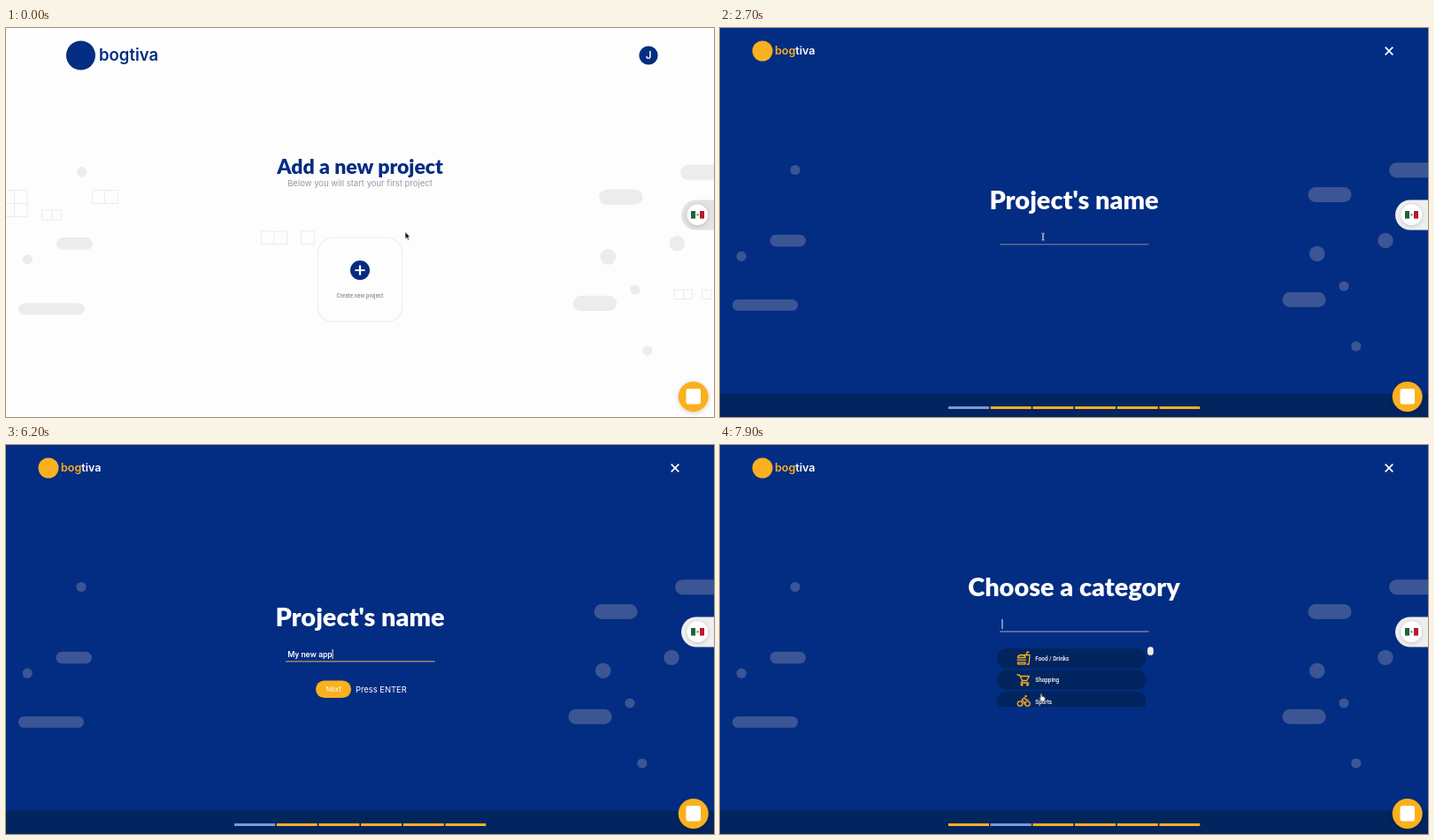
An HTML page that plays this animation: 800x440 px, repeating every 8000 ms.

```html
<!DOCTYPE html>
<html lang="en">
<head>
<meta charset="utf-8">
<title>New project</title>
<style>
  html, body { margin: 0; width: 100%; height: 100%; overflow: hidden; background: #fdfdfe; }
  svg { display: block; width: 100vw; height: 100vh; font-family: Inter, sans-serif; }
  .title { font: 900 28.9px Lato, sans-serif; text-anchor: middle; fill: #fff; }
  .small { font-family: Roboto, sans-serif; }
  .mid { text-anchor: middle; }
  .line { fill: none; stroke-linecap: round; stroke-linejoin: round; }

  #light, #dark, #question, #category, #active, #tab, #status, #focus, #next,
  #mouse, #halo, #arrow, #beam, #hand { animation: 8s linear infinite; }
  #light, #dark, #active, #tab, #arrow, #beam, #hand { animation-timing-function: step-end; }

  #light { animation-name: light; }
  @keyframes light { 0% { visibility: visible } 18.6%, 100% { visibility: hidden } }
  #dark { animation-name: dark; }
  @keyframes dark { 0% { visibility: hidden } 18.6%, 100% { visibility: visible } }
  #tab { animation-name: tab; }
  @keyframes tab { 0% { fill: #e3e3e6 } 18.6%, 100% { fill: #efeff0 } }

  #status { animation-name: status; }
  @keyframes status {
    0%, 16.1% { opacity: 0 } 16.2%, 18% { opacity: 1 } 20%, 100% { opacity: 0 }
  }

  #question { animation-name: question; }
  @keyframes question {
    0%, 91.3% { transform: none; opacity: 1; animation-timing-function: ease-out }
    93.7%, 94.8% { transform: translateY(-18px); opacity: 1 }
    95%, 100% { transform: translateY(-18px); opacity: 0 }
  }
  #category { animation-name: category; }
  @keyframes category { 0%, 94.8% { opacity: 0 } 97%, 100% { opacity: 1 } }
  #active { animation-name: active; }
  @keyframes active { 0% { transform: none } 95%, 100% { transform: translateX(47.7px) } }

  #focus { animation-name: focus; transform-origin: 400px 245px; }
  @keyframes focus {
    0%, 36.2% { transform: scaleX(0); animation-timing-function: ease-out }
    40%, 100% { transform: none }
  }
  #next { animation-name: next; }
  @keyframes next {
    0%, 49.5% { opacity: 0; transform: translateY(-4px) }
    52.5%, 100% { opacity: 1; transform: none }
  }

  #mouse { animation-name: mouse; }
  @keyframes mouse {
    0%, 12.3% { transform: translate(451px, 230.5px); animation-timing-function: ease-in-out }
    16.8%, 24.8% { transform: translate(400px, 273px); animation-timing-function: ease-in-out }
    35%, 43.5% { transform: translate(364px, 235px); animation-timing-function: ease-in-out }
    46.3%, 78% { transform: translate(352px, 288px); animation-timing-function: ease-in-out }
    85%, 100% { transform: translate(362.5px, 281.5px) }
  }
  #halo { animation-name: halo; }
  @keyframes halo {
    0%, 15.9% { opacity: 0 } 17%, 17.6% { opacity: 1 } 18.5%, 36% { opacity: 0 }
    37.3%, 38% { opacity: 1 } 40%, 88.5% { opacity: 0 }
    90%, 92.5% { opacity: 1 } 95%, 100% { opacity: 0 }
  }
  #arrow { animation-name: arrow; }
  @keyframes arrow {
    0% { opacity: 1 } 33.7% { opacity: 0 } 44.5% { opacity: 1 }
    48.7% { opacity: 0 } 78.5% { opacity: 1 } 83.7%, 100% { opacity: 0 }
  }
  #beam { animation-name: beam; }
  @keyframes beam { 0% { opacity: 0 } 33.7% { opacity: 1 } 44.5%, 100% { opacity: 0 } }
  #hand { animation-name: hand; }
  @keyframes hand { 0% { opacity: 0 } 83.7%, 100% { opacity: 1 } }
</style>
</head>
<body>
<svg viewBox="0 0 800 440">
  <defs>
    <g id="shapes">
      <rect x="56.5" y="233.7" width="40.5" height="13.5" rx="6.7"/>
      <rect x="14" y="307" width="74" height="12.8" rx="6.4"/>
      <rect x="664.5" y="180" width="49" height="17" rx="8.5"/>
      <rect x="756" y="152.3" width="60" height="17" rx="8.5"/>
      <rect x="635.5" y="298.7" width="49" height="17" rx="8.5"/>
      <circle cx="85" cy="160.5" r="5.6"/>
      <circle cx="24.2" cy="258.2" r="5.6"/>
      <circle cx="674.7" cy="255.3" r="8.8"/>
      <circle cx="752" cy="240.4" r="8.7"/>
      <circle cx="705" cy="292" r="5.6"/>
      <circle cx="718.8" cy="360" r="5.6"/>
    </g>
    <filter id="shadow" x="-40%" y="-40%" width="180%" height="180%">
      <feDropShadow dx="0" dy="1" stdDeviation="2.6" flood-opacity=".2"/>
    </filter>
    <clipPath id="listClip"><rect x="310" y="225" width="182" height="71"/></clipPath>
  </defs>

  <g id="light">
    <rect width="800" height="440" fill="#fdfdfe"/>
    <rect width="800" height="52" fill="#fefefe"/>
    <use href="#shapes" fill="#ececed" transform="scale(1.0083 1.0139)"/>
    <path fill="none" stroke="#ebece9" d="M-5 183.5h29v30h-29zM9.5 183.5v30M-5 198.5h29M97.5 183.5h29v15h-29zM111.5 183.5v15
      M40.500 206h22v11h-22zM51.500 206v11M288.500 230h29v14.500h-29zM303 230v14.500M333.500 230h15v14.500h-15z
      M755 296h20.500v10.500h-20.500zM765.500 296v10.500M786.500 296h10.500v10.500h-10.500z"/>
    <circle cx="84.5" cy="31" r="16.5" fill="#032d82"/>
    <text x="105" y="37" font-size="18.5" font-weight="600" fill="#032d82">bogtiva</text>
    <circle cx="726" cy="31" r="10.6" fill="#032d82"/>
    <text class="mid" x="726" y="35" font-size="11.5" font-weight="600" fill="#fff">J</text>
    <text class="title" x="400" y="165" style="font-size:23px;fill:#032d82">Add a new project</text>
    <text class="mid" x="400" y="178.5" font-size="9.5" fill="#9a9a9e">Below you will start your first project</text>
    <rect x="352.5" y="237.2" width="95" height="95" rx="17" fill="#fdfdfe" stroke="#efeff0" stroke-width="1.2"/>
    <circle cx="400" cy="274" r="11" fill="#032d82"/>
    <path d="M394.5 274h11M400 268.5v11" stroke="#fff" stroke-width="2.2"/>
    <text class="mid small" x="400" y="305.3" font-size="6.35" fill="#77777b">Create new project</text>
  </g>

  <g id="dark">
    <rect width="800" height="440" fill="#032d82"/>
    <rect y="413.5" width="800" height="27" fill="#02245f"/>
    <use href="#shapes" fill="#3b5595"/>
    <circle cx="48" cy="26" r="11.5" fill="#fbb01f"/>
    <text x="62" y="29.8" font-size="12.5" font-weight="600" fill="#fff"><tspan fill="#fbb01f">bog</tspan>tiva</text>
    <path d="M751.7 21.7l8.6 8.6m0-8.6l-8.6 8.6" stroke="#fff" stroke-width="1.7"/>
    <path d="M258 429.5H542.3" stroke="#fbb01f" stroke-width="2.8" stroke-dasharray="46 1.7"/>
    <path id="active" d="M258 429.5h46" stroke="#7b9ad8" stroke-width="2.8"/>

    <g id="question">
      <text class="title" x="400" y="205.3">Project's name</text>
      <path d="M316 244.8h168.5" stroke="#86888d"/>
      <path id="focus" d="M316 244.8h168.5" stroke="#b3924f"/>
      <text id="typed" class="small" xml:space="preserve" x="318.3" y="240.3" font-size="9.4" font-weight="500" fill="#fff"></text>
      <rect id="caret" y="231" width=".9" height="11" fill="#fff"/>
      <g id="next">
        <rect x="350" y="266.5" width="40" height="19.5" rx="9.7" fill="#fbb01f"/>
        <text class="mid" x="370" y="279.3" font-size="8" fill="#fff">Next</text>
        <text x="395" y="279.8" font-size="9.4" fill="#fff">Press ENTER</text>
      </g>
    </g>

    <g id="category">
      <text class="title" x="400" y="171.3">Choose a category</text>
      <path d="M316 211h168.5" stroke="#a5aabb"/>
      <rect x="318.5" y="197" width=".9" height="11" fill="#fff"/>
      <g clip-path="url(#listClip)">
        <g fill="#02245f">
          <rect x="313" y="230.3" width="168.5" height="22.3" rx="11"/>
          <rect x="313" y="254.5" width="168.5" height="22.3" rx="11"/>
          <rect x="313" y="278.7" width="168.5" height="22.3" rx="11"/>
        </g>
        <rect x="483" y="228.3" width="6.8" height="9.5" rx="3.4" fill="#eee9e0"/>
        <g class="line" stroke="#fbb01f" stroke-width="1.3">
          <path d="M336.5 240.5c0-4 8.5-4 8.5 0zM336 243.2h9.5M336.5 245.8h8.5v2h-8.5zM343.5 237.5h6.5l-1 10.5h-2M346.8 237.5v-3l2-.5"/>
          <path d="M336 260h2.3l3.4 6.5h5l2.7-5h-10.3M341.7 266.5l-1.5 2.5h8.5"/>
          <circle cx="341" cy="271.3" r=".8"/>
          <circle cx="347.5" cy="271.3" r=".8"/>
          <circle cx="339" cy="292.5" r="2.7"/>
          <circle cx="347.5" cy="292.5" r="2.7"/>
          <path d="M343.5 293v-2.5l-2.5-2 2.7-2.5 2 2.2h2.3"/>
          <circle cx="345.5" cy="284.3" r=".6"/>
        </g>
        <g class="small" font-size="6.35" font-weight="500" fill="#fff">
          <text x="356.3" y="244.2">Food / Drinks</text>
          <text x="356.3" y="268.4">Shopping</text>
          <text x="356.3" y="292.6">Sports</text>
        </g>
      </g>
    </g>
  </g>

  <g id="status">
    <path d="M0 433h262q2.5 0 2.5 2.5v5H0z"/>
    <text class="small" x="-4" y="441.5" font-size="7.3" fill="#8b8b8b">Esperando k.zuvelt.com</text>
  </g>

  <path id="tab" d="M800 194.5h-20a17 17 0 0 0 0 34h20z"/>
  <circle cx="781.3" cy="211.3" r="11.7" fill="#fff" filter="url(#shadow)"/>
  <rect x="774" y="207" width="5" height="8.6" fill="#17663f"/>
  <rect x="784" y="207" width="5" height="8.6" fill="#b91930"/>
  <circle cx="781.5" cy="211.3" r="1.2" fill="#8d8a60"/>
  <circle cx="776.7" cy="417" r="17" fill="#fbb01f" filter="url(#shadow)"/>
  <rect x="768.5" y="408" width="16.5" height="17.5" rx="2.5" fill="#fff"/>

  <g id="mouse">
    <circle id="halo" cy="1" r="18" fill="#b8b49c" fill-opacity=".07"/>
    <path id="arrow" d="M0 0v8.3l1.9-1.7 1.3 3 1.4-.6-1.3-2.9h2.5z" fill="#111" stroke="#fff" stroke-width=".7"/>
    <path id="beam" class="line" d="M-1.5-4q1.5 0 1.5 1v6q0 1-1.5 1M1.5-4q-1.5 0-1.5 1v6q0 1 1.5 1" stroke="#ddd" stroke-width=".8"/>
    <path id="hand" d="M-.6 0q.8-.8 1.5 0l.5 2.8 3 .9q.8.3.6 1.300l-.6 3.500h-3.600l-2.600-3.400q0-1.200 1.500-.6z" fill="#fff" stroke="#222" stroke-width=".6"/>
  </g>
</svg>
<script>
  const phrase = "My new app";
  const keyTimes = [4000, 4500, 4800, 5100, 5200, 5400, 5500, 5600, 5800, 6150];
  const focusTime = 3000, blurTime = 7150;
  const typed = document.getElementById("typed");
  const caret = document.getElementById("caret");
  const clock = document.getElementById("mouse").getAnimations()[0];
  let shown = null;

  function draw() {
    const t = (clock.currentTime || 0) % 8000;
    const count = keyTimes.filter(k => k <= t).length;
    if (count !== shown) {
      shown = count;
      typed.textContent = phrase.slice(0, count);
      caret.setAttribute("x", 318.3 + (count ? typed.getComputedTextLength() : 0));
    }
    const lastKey = count ? keyTimes[count - 1] : focusTime;
    const on = t >= focusTime && t < blurTime && (t - lastKey) % 1000 < 500;
    caret.setAttribute("opacity", on ? 1 : 0);
    requestAnimationFrame(draw);
  }
  draw();
</script>
</body>
</html>
```
